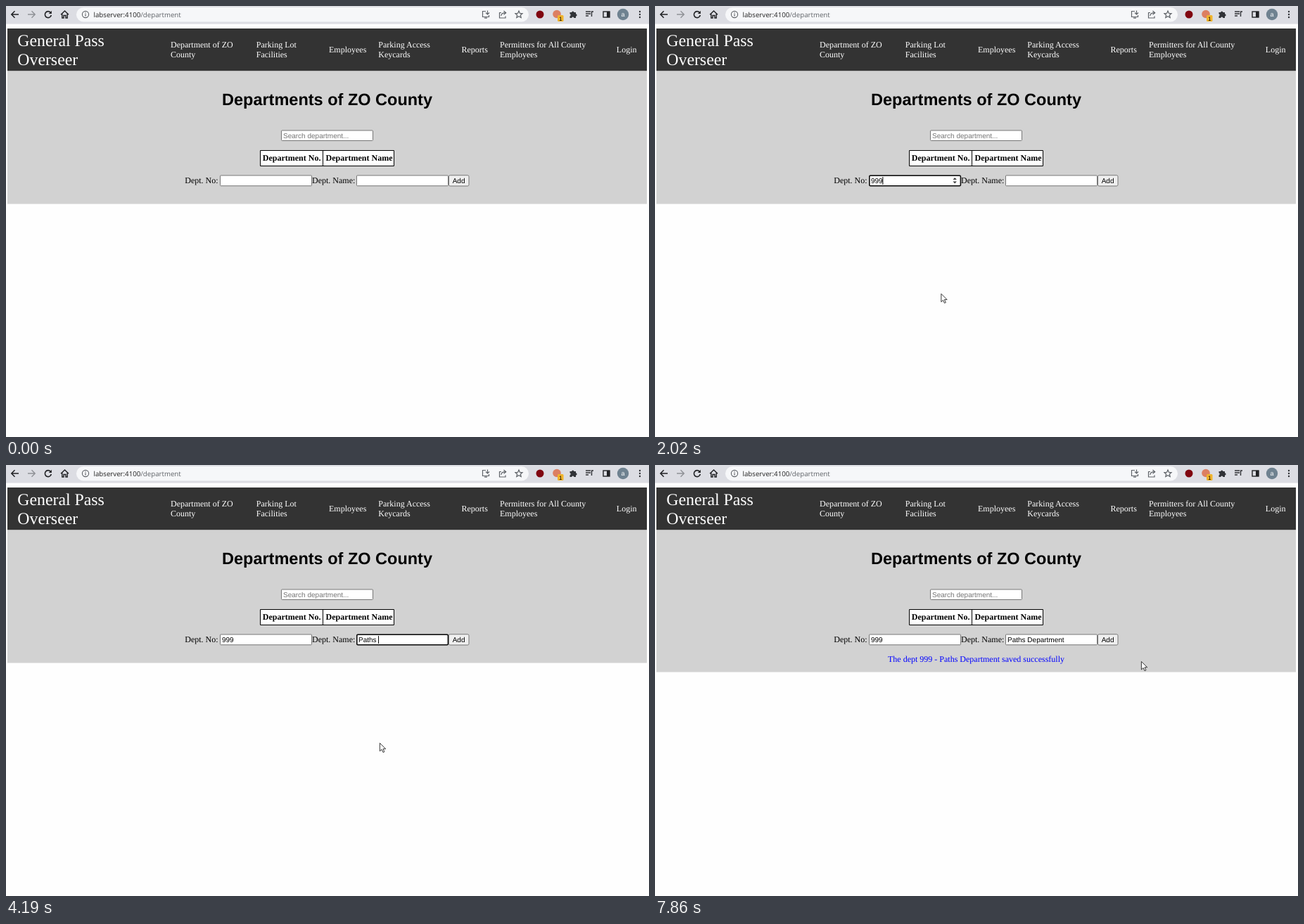
An HTML page that plays this animation: 914 by 613 pixels, repeating every 8 s.

```html
<!DOCTYPE html>
<html lang="en">
<head>
<meta charset="utf-8">
<title>Department form</title>
<style>
  html, body { margin: 0; width: 100%; height: 100%; overflow: hidden; background: #fff; }
  svg { display: block; width: 914px; height: 613px; }
  text { white-space: pre; text-rendering: geometricPrecision; }
  .serif { font: 12px "Liberation Serif", serif; }
  .bold { font-weight: bold; }
  .sans { font: 10px "Liberation Sans", sans-serif; }
  .ui { font: 9px "Open Sans", sans-serif; fill: #222; }
  .mid { text-anchor: middle; }
  .nav { fill: #fff; }
  .field { fill: #fff; stroke: #767676; }
  .ring { fill: none; stroke: #101010; stroke-width: 1.6; }
  .icon { fill: none; stroke: #3c4043; stroke-width: 1.4; }
  .caret { stroke: #000; stroke-width: 1; }
</style>
</head>
<body>
<svg viewBox="0 0 914 613">
  <defs>
    <filter id="shadow" x="-10%" y="-10%" width="120%" height="125%">
      <feDropShadow dx="0" dy="1" stdDeviation="1.2" flood-opacity=".28"/>
    </filter>
  </defs>
  <rect width="914" height="613" fill="#fefefe"/>

  <!-- browser toolbar -->
  <rect width="914" height="25" fill="#dcdde3"/>
  <rect y="25" width="914" height="1" fill="#ebebee"/>
  <rect x="100" y="2" width="643" height="20.5" rx="10.25" fill="#f6f7f9"/>
  <g class="icon">
    <path d="M18 12H8M12.5 7.3L7.8 12L12.5 16.7" stroke="#202124" stroke-width="1.5"/>
    <path d="M31 12H41M36.5 7.3L41.2 12L36.5 16.7" stroke="#8f9196"/>
    <path d="M63.3 9.2A4.5 4.5 0 1 0 64.3 13" stroke="#202124" stroke-width="1.6"/>
    <path d="M64.9 6.8V11H60.7Z" fill="#202124" stroke="none"/>
    <path d="M78 12.3L83.5 7L89 12.3M79.8 11V17H82V13.5H85V17H87.2V11" stroke="#202124"/>
    <circle cx="113" cy="12" r="4.6" stroke="#5f6368" stroke-width="1.1"/>
    <path d="M113 11.4V14.6M113 9.3V10.4" stroke="#5f6368" stroke-width="1.2"/>
    <g stroke="#5f6368" stroke-width="1.2">
      <path d="M682 7.5H677.5V15.5H686.5V13M680 17.2H684M684.5 6.5V11.5M682 9.5L684.5 12L687 9.5"/>
      <path d="M704 9.5H701.5V17H710V14.5M703.8 14C704 10.8 706 9.7 710 9.7M707.5 7L710.7 9.7L707.5 12.4"/>
      <path d="M729 7L730.5 10.4L734 10.7L731.3 13L732.2 16.6L729 14.7L725.8 16.6L726.7 13L724 10.7L727.5 10.4Z"/>
    </g>
    <path d="M824 8H831M824 11H831M824 14H828M832.5 15V8H835" stroke="#303236"/>
    <rect x="849" y="8" width="9" height="8" stroke="#202124"/>
    <path d="M854 8H858V16H854Z" fill="#202124" stroke="none"/>
  </g>
  <circle cx="759" cy="12" r="5.5" fill="#800610"/>
  <circle cx="783" cy="11.5" r="5.8" fill="#dc7f62"/>
  <rect x="784" y="13" width="8.5" height="9" rx="1.5" fill="#f0b42c"/>
  <text x="788.2" y="20.5" class="sans mid" style="font-size:8px">1</text>
  <path d="M801.5 9H804.2A1.6 1.6 0 1 1 807.4 9H810V11.3A1.6 1.6 0 1 1 810 14.5V17H807.4A1.6 1.6 0 0 0 804.2 17H801.5V14.4A1.6 1.6 0 0 0 801.5 11.3Z" fill="#303236"/>
  <circle cx="877" cy="12" r="8.2" fill="#6f8290"/>
  <text x="877" y="14.8" class="sans mid" style="font-size:9px" fill="#fff">a</text>
  <g fill="#303236"><circle cx="901" cy="8" r="1.2"/><circle cx="901" cy="12" r="1.2"/><circle cx="901" cy="16" r="1.2"/></g>
  <text x="124.5" y="15.6" class="ui" style="font-size:9.7px">labserver:4100<tspan fill="#5f6368">/department</tspan></text>

  <!-- page -->
  <rect x="2" y="32" width="909" height="60.5" fill="#333"/>
  <rect id="panel" x="2" y="92.5" width="909" height="189" fill="#d2d2d2"/>
  <g id="nav" class="nav serif">
    <g style="font-size:23.8px"><text x="16.3" y="56.5">General Pass</text><text x="16.3" y="84">Overseer</text></g>
  </g>
  <text x="307" y="141" class="sans" style="font-size:23.5px;font-weight:bold">Departments of ZO County</text>

  <rect x="391.5" y="177" width="130" height="14.5" rx="1" class="field"/>
  <text x="394" y="187.6" class="sans" fill="#757575">Search department...</text>

  <path d="M361.5 205.5H551.5V227.5H361.5ZM450.5 205.5V227.5" fill="#fff" stroke="#000"/>
  <text x="364.8" y="220.3" class="serif bold">Department No.</text>
  <text x="454.5" y="220.3" class="serif bold">Department Name</text>

  <text x="254.3" y="252" class="serif">Dept. No:</text>
  <rect x="304.5" y="241" width="130" height="14.8" rx="1" class="field"/>
  <text id="noText" x="307" y="251.8" class="sans"></text>
  <path id="spin" d="M423.5 247L426.2 244L428.9 247ZM423.5 249.5L426.2 252.5L428.9 249.5Z" fill="#404040"/>
  <rect id="noRing" x="304.8" y="241.2" width="129.6" height="14.6" rx="1.5" class="ring"/>
  <path id="noCaret" d="M307.5 243V254" class="caret"/>

  <text x="435" y="252" class="serif">Dept. Name:</text>
  <rect x="498.5" y="241" width="130" height="14.8" rx="1" class="field"/>
  <text id="nameText" x="501" y="251.8" class="sans"></text>
  <rect id="nameRing" x="498.8" y="241.2" width="129.6" height="14.6" rx="1.5" class="ring"/>
  <path id="nameCaret" d="M501.5 243V254" class="caret"/>

  <rect id="button" x="629.5" y="240.8" width="28.5" height="15.2" rx="1.8" stroke="#767676"/>
  <text x="643.6" y="251.8" class="sans mid">Add</text>
  <text id="message" x="456.5" y="280" class="serif mid" fill="#00f">The dept 999 - Paths Department saved successfully</text>

  <g id="popup">
    <g filter="url(#shadow)" fill="#fff">
      <rect id="sheet" x="548.5" y="263" width="97.5" height="166" rx="3"/>
      <path d="M557.5 263.2L564 257.5L570.5 263.2Z"/>
    </g>
    <g id="items" class="ui"></g>
  </g>

  <circle id="glow" r="8.5" fill="#ffee28" opacity=".75"/>
  <g id="cursor">
    <path id="arrow" d="M.4 .5V12L3.1 9.5L5 13.7L6.9 12.9L5 8.8H8.7Z" fill="#fff" stroke="#222" stroke-width=".9"/>
    <path id="beam" d="M-2 -5H-.6L0 -4.4L.6 -5H2M0 -4.4V4.9M-2 5.5H-.6L0 4.9L.6 5.5H2" fill="none" stroke="#333" stroke-width=".9"/>
  </g>
</svg>
<script>
const LOOP = 8000;
const NS = "http://www.w3.org/2000/svg";
const ui = {};
document.querySelectorAll("[id]").forEach(el => ui[el.id] = el);

const show = (el, on) => { el.style.display = on ? "" : "none"; };
const within = (t, a, b) => t >= a && t < b;

function addText(parent, x, y, str) {
  const el = document.createElementNS(NS, "text");
  el.setAttribute("x", x);
  el.setAttribute("y", y);
  el.textContent = str;
  parent.append(el);
  return el;
}

[
  [234, "Department of ZO", "County"],
  [355.8, "Parking Lot", "Facilities"],
  [459, "Employees"],
  [529.3, "Parking Access", "Keycards"],
  [647.5, "Reports"],
  [702, "Permitters for All County", "Employees"],
  [867.8, "Login"]
].forEach(([x, ...lines]) => lines.forEach((line, i) =>
  addText(ui.nav, x, lines.length > 1 ? 59.4 + i * 13.6 : 66, line)));

const hints = ["asdf", "hello", "asd", "zxcv", "asdfasdf", "public restrooms"];
const rows = hints.map((h, i) => addText(ui.items, 557.5, 282.8 + i * 26.6, h));

// Pointer path: time, x, y
const path = [
  [30, 618, 581], [600, 345, 249], [870, 345, 249],
  [1090, 372, 355], [1310, 386, 395], [1550, 398, 419], [1950, 398, 419],
  [2430, 540.5, 247], [2540, 540.5, 247], [2840, 531, 395], [6570, 531, 395],
  [6870, 665, 268], [7110, 646, 246], [7350, 646, 246],
  [7480, 692, 280], [7530, 689, 282], [7780, 689, 282], [7860, 691, 279]
];

const rests = (a, b) => a[1] === b[1] && a[2] === b[2];

// Velocity at a path point, zero next to a pause
function slope(i, k) {
  const a = path[i - 1], b = path[i], c = path[i + 1];
  if (!a || !c || rests(a, b) || rests(b, c)) return 0;
  return (c[k] - a[k]) / (c[0] - a[0]);
}

function pointer(t) {
  const last = path.length - 1;
  if (t >= path[last][0]) return path[last].slice(1);
  let i = 0;
  while (i < last - 1 && t >= path[i + 1][0]) i++;
  const a = path[i], b = path[i + 1], d = b[0] - a[0];
  const u = Math.max(0, (t - a[0]) / d), v = 1 - u;
  return [1, 2].map(k =>
    a[k] * v * v * (1 + 2 * u) + b[k] * u * u * (3 - 2 * u) +
    d * u * v * (v * slope(i, k) - u * slope(i + 1, k)));
}

const noFocus = 640, nameFocus = 2475, submit = 7180, saved = 7280;
const noKeys = [1690, 1780, 1880];
const nameKeys = [3370, 3600, 3710, 3800, 3920, 4190, 4490, 4690,
  4960, 5060, 5160, 5360, 5530, 5610, 5690, 5770];
const clicks = [[noFocus, 710], [2450, 2560], [submit, 7270]];

const typed = (str, keys, t) => str.slice(0, keys.filter(k => k <= t).length);

function caretOn(t, focus, keys) {
  const start = [focus, ...keys].filter(k => k <= t).pop();
  return Math.floor((t - start) / 530) % 2 === 0;
}

function setInput(text, caret, str, on) {
  text.textContent = str;
  show(caret, on);
  const shift = str ? text.getComputedTextLength() - .3 : 0;
  caret.setAttribute("transform", `translate(${shift} 0)`);
}

function draw(t) {
  const [x, y] = pointer(t);
  const inRow = within(y, 241, 256);
  const onNo = inRow && within(x, 304, 435);
  const onName = inRow && within(x, 498, 629);
  const onAdd = inRow && within(x, 629, 658);
  const noActive = within(t, noFocus, nameFocus);
  const nameActive = within(t, nameFocus, submit);

  setInput(ui.noText, ui.noCaret, typed("999", noKeys, t),
    noActive && caretOn(t, noFocus, noKeys));
  setInput(ui.nameText, ui.nameCaret, typed("Paths Department", nameKeys, t),
    nameActive && caretOn(t, nameFocus, nameKeys));
  show(ui.noRing, noActive);
  show(ui.nameRing, nameActive);
  show(ui.spin, onNo || within(t, noFocus, 2560));

  // Suggestions shrink on the first key and fade on the second
  const short = t >= nameKeys[0];
  show(ui.popup, within(t, nameFocus, 3750));
  ui.popup.setAttribute("opacity", Math.min(1, Math.max(0, (3750 - t) / 150)));
  ui.sheet.setAttribute("height", short ? 33 : 166);
  rows.forEach((row, i) => {
    show(row, !short || i === 0);
    row.textContent = short ? hints[5] : hints[i];
  });

  const pressed = clicks.some(([a, b]) => within(t, a, b));
  ui.button.setAttribute("fill", onAdd ? (pressed ? "#f5f5f5" : "#e5e5e5") : "#efefef");
  show(ui.message, t >= saved);
  ui.panel.setAttribute("height", t >= saved ? 202 : 189);

  show(ui.glow, pressed);
  ui.glow.setAttribute("cx", x - 1);
  ui.glow.setAttribute("cy", y - .3);
  show(ui.cursor, t >= 30);
  ui.cursor.setAttribute("transform", `translate(${x} ${y})`);
  show(ui.beam, onNo || onName);
  show(ui.arrow, !onNo && !onName);
}

function frame(now) {
  draw(now % LOOP);
  requestAnimationFrame(frame);
}
draw(0);
requestAnimationFrame(frame);
</script>
</body>
</html>
```
